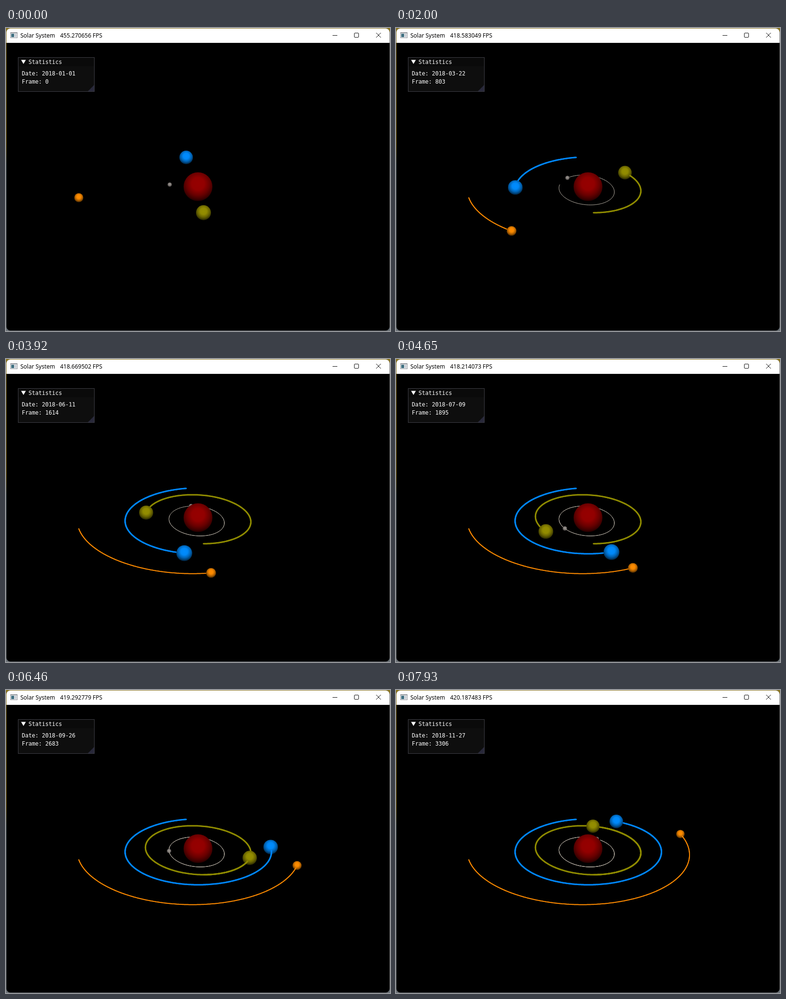
An HTML page with a canvas for the animation above (7990 ms loop, 802 by 632 pixels).

```html
<!DOCTYPE html>
<html lang="en">
<head>
<meta charset="utf-8">
<title>Solar System</title>
<style>
  html, body { margin: 0; width: 100%; height: 100%; overflow: hidden; background: #000; }
  canvas { display: block; width: 802px; height: 632px; }
</style>
</head>
<body>
<canvas id="stage" width="802" height="632"></canvas>
<script>
const ctx = document.getElementById('stage').getContext('2d');
const LOOP = 7990, STEP = 66.6, RAD = Math.PI / 180;

// One astronomical unit in pixels; camera at (0, 5, 10) AU with a 20 degree view.
const AU = 152.14, CAMERA = 1701, SIN = 1 / Math.sqrt(5), COS = 2 / Math.sqrt(5);
const EPOCH = 6574.5; // days from J2000 to 2018-01-01

// Keplerian elements: axis, eccentricity, inclination, longitude, perihelion, node, degrees per day
const planets = [
  { el: [0.3871, 0.20563, 7.005, 252.251, 77.457, 48.331, 4.09233], size: 0.03, color: [148, 142, 138], trail: '#a09a90', width: 1 },
  { el: [0.72333, 0.00677, 3.395, 181.98, 131.6, 76.68, 1.60213], size: 0.097, color: [148, 142, 0], trail: '#8e8a00', width: 3 },
  { el: [1, 0.01671, 0, 100.464, 102.937, 0, 0.98561], size: 0.1, color: [0, 140, 255], trail: '#0086f8', width: 3 },
  { el: [1.52368, 0.0934, 1.85, 355.447, 336.056, 49.56, 0.52403], size: 0.06, color: [255, 140, 0], trail: '#f68600', width: 2 }
];
const sun = { size: 0.198, color: [150, 0, 0] };

function orbit([a, e, incl, lon, peri, node, rate], day) {
  const M = (lon + rate * (EPOCH + day) - peri) * RAD;
  let E = M;
  for (let i = 0; i < 8; i++) E -= (E - e * Math.sin(E) - M) / (1 - e * Math.cos(E));
  const nu = Math.atan2(Math.sqrt(1 - e * e) * Math.sin(E), Math.cos(E) - e);
  const r = a * AU * (1 - e * Math.cos(E));
  const O = node * RAD, u = nu + peri * RAD - O, i = incl * RAD;
  return project(
    r * (Math.cos(O) * Math.cos(u) - Math.sin(O) * Math.sin(u) * Math.cos(i)),
    r * Math.sin(u) * Math.sin(i),
    -r * (Math.sin(O) * Math.cos(u) + Math.cos(O) * Math.sin(u) * Math.cos(i)));
}

function project(x, y, z) {
  const depth = CAMERA - z * COS - y * SIN, scale = CAMERA / depth;
  return { x, y, z, depth, scale, sx: 401 + x * scale, sy: 331 + (z * SIN - y * COS) * scale };
}

for (const p of planets) {
  p.path = Array.from({ length: 340 }, (_, day) => orbit(p.el, day));
}

const knots = [[0, 18], [15, 438], [41, 1167], [57, 1614], [78, 2204], [95, 2683], [117, 3306]];
function frameAt(step) {
  const i = Math.min(knots.length - 2, knots.findLastIndex(k => k[0] <= step));
  const [k0, f0] = knots[i], [k1, f1] = knots[i + 1];
  return Math.round(f0 + (f1 - f0) * (step - k0) / (k1 - k0));
}

const rates = ['421.306518', '418.583049', '418.157580', '418.669502',
               '418.214073', '417.563521', '419.292779', '420.187483'];

function drawSphere(body, p) {
  const r = body.size * AU * p.scale, cy = p.sy - r * 0.2;
  const g = ctx.createRadialGradient(p.sx, cy, 0, p.sx, cy, r * 1.25);
  for (const [at, light] of [[0, 1], [0.35, 0.97], [0.64, 0.7], [0.85, 0.42], [1, 0.12]]) {
    g.addColorStop(at, `rgb(${body.color.map(c => Math.round(c * light))})`);
  }
  ctx.fillStyle = g;
  ctx.beginPath();
  ctx.arc(p.sx, p.sy, r, 0, 7);
  ctx.fill();
}

function drawSegment(planet, a, b) {
  ctx.strokeStyle = planet.trail;
  ctx.lineWidth = planet.width;
  ctx.beginPath();
  ctx.moveTo(a.sx, a.sy);
  ctx.lineTo(b.sx, b.sy);
  ctx.stroke();
}

function drawSystem(day) {
  const center = project(0, 0, 0);
  const items = [{ depth: center.depth, draw: () => drawSphere(sun, center) }];
  for (const planet of planets) {
    const here = orbit(planet.el, day);
    items.push({ depth: here.depth, draw: () => drawSphere(planet, here) });
    const trail = [...planet.path.slice(0, Math.floor(day) + 1), here];
    for (let i = 1; i < trail.length; i++) {
      const a = trail[i - 1], b = trail[i];
      const gap = Math.hypot(b.x - here.x, b.y - here.y, b.z - here.z);
      if (gap < planet.size * AU) continue; // inside the planet
      items.push({ depth: (a.depth + b.depth) / 2, draw: () => drawSegment(planet, a, b) });
    }
  }
  ctx.lineCap = 'round';
  items.sort((a, b) => b.depth - a.depth).forEach(item => item.draw());
}

function box(color, x, y, w, h) {
  ctx.fillStyle = color;
  ctx.fillRect(x, y, w, h);
}

function triangle(color, ...pts) {
  ctx.fillStyle = color;
  ctx.beginPath();
  for (let i = 0; i < 6; i += 2) ctx.lineTo(pts[i], pts[i + 1]);
  ctx.fill();
}

function text(str, x, y, color, font) {
  ctx.font = font;
  ctx.fillStyle = color;
  ctx.fillText(str, x, y);
}

function drawWindow(fps) {
  const desk = ctx.createLinearGradient(0, 0, 0, 632);
  desk.addColorStop(0, '#8a7420');
  desk.addColorStop(0.38, '#9a7a1c');
  desk.addColorStop(0.45, '#58666e');
  desk.addColorStop(1, '#6a7076');
  ctx.fillStyle = desk;
  ctx.fillRect(0, 0, 802, 632);
  box('#707070', 801, 8, 1, 616);

  ctx.beginPath();
  ctx.roundRect(1, 1, 800, 630, 8);
  ctx.clip();
  box('#000', 0, 0, 802, 632);
  box('#fff', 0, 0, 802, 31);

  box('#8c9096', 9, 9, 15, 12);
  box('#f4f6f8', 10, 11, 13, 9);
  box('#3f6f80', 11, 12, 6, 7);
  box('#c9ced4', 18, 12, 4, 7);

  const ui = '12px "Noto Sans", "Open Sans", sans-serif';
  text('Solar System', 30, 20, '#000', ui);
  text(fps + ' FPS', 113, 20, '#000', ui);

  box('#111', 682, 15, 10, 1);
  ctx.strokeStyle = '#111';
  ctx.lineWidth = 1;
  ctx.lineCap = 'butt';
  ctx.beginPath();
  ctx.roundRect(727.5, 10.5, 9, 9, 1.5);
  ctx.moveTo(773, 10);
  ctx.lineTo(783, 20);
  ctx.moveTo(783, 10);
  ctx.lineTo(773, 20);
  ctx.stroke();
}

function drawStatistics(frame) {
  const date = new Date(Date.UTC(2018, 0, 1 + Math.floor(frame / 10))).toISOString().slice(0, 10);
  const mono = '11.63px "DejaVu Sans Mono", monospace';
  box('#3e3e46', 25, 61, 160, 72);
  box('#0e0e0e', 26, 62, 158, 70);
  box('#0a0a0a', 26, 62, 158, 18);
  triangle('#28283a', 184, 119, 184, 132, 171, 132);
  triangle('#fff', 31.5, 66.5, 41.5, 66.5, 36.5, 75);
  text('Statistics', 47, 75, '#fff', mono);
  text('Date: ' + date, 33, 99, '#fff', mono);
  text('Frame: ' + frame, 33, 116, '#fff', mono);
}

function render(now) {
  const t = now % LOOP, started = t >= 130;
  const step = Math.floor((t - 123) / STEP);
  const frame = started ? frameAt(step) : 0;
  const second = Math.floor((130 + step * STEP - 90) / 1000);

  ctx.save();
  drawWindow(started ? rates[second] : '455.270656');
  drawSystem(frame / 10);
  drawStatistics(frame);
  ctx.restore();
}

const start = performance.now();
function tick() {
  render(performance.now() - start);
  requestAnimationFrame(tick);
}
tick();
</script>
</body>
</html>
```
